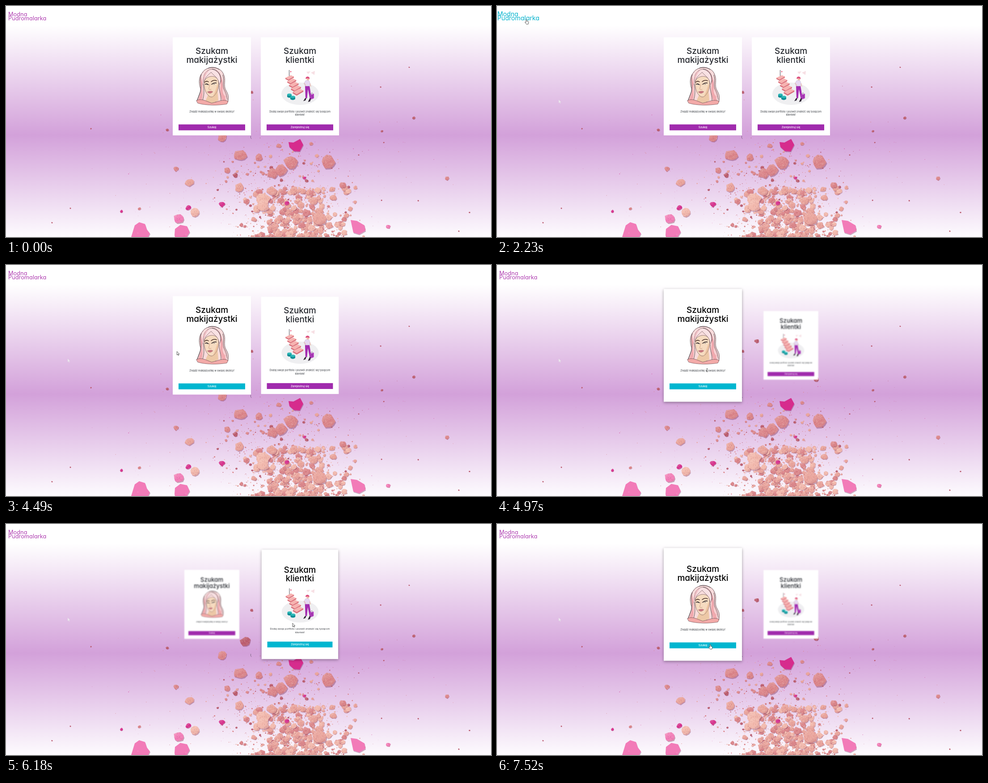
An HTML page with a canvas that plays this animation: 1085x516 px, repeating every 8000 ms.

```html
<!DOCTYPE html>
<html lang="pl">
<head>
<meta charset="utf-8">
<title>Modna Pudromalarka</title>
<style>
  html, body { margin: 0; width: 100%; height: 100%; overflow: hidden; }
  body {
    position: relative;
    background: linear-gradient(#fff 43px, #d3a1da 288px, #fdfbfe 516px);
    font-family: Inter, sans-serif;
    font-feature-settings: "cv11";
  }
  canvas, svg { position: absolute; left: 0; top: 0; }
  .card { top: 70px; width: 175px; height: 219px; overflow: visible; fill: none; text-anchor: middle; }
  .plate { fill: #fff; }
  .title { font-size: 19px; font-weight: 500; fill: #25282e; }
  .note { font-size: 5.6px; fill: #33373d; }
  .button { fill: #a02bad; }
  .label { font-size: 6.1px; font-weight: 500; fill: #fff; }
  .hover .title { fill: #000; }
  .hover .button { fill: #00b6d0; }
  #logo { font-size: 12.8px; transform-origin: 46.5px 22px; }
  #cursor path { stroke: #333; stroke-width: .8; fill: #fff; }
</style>
</head>
<body>
<canvas id="powder" width="1085" height="516"></canvas>

<svg class="card" id="left" style="left:373px" viewBox="373 70 175 219">
  <rect class="plate" x="373" width="175"/>
  <g class="title"><text x="460.5" y="107">Szukam</text><text x="460.5" y="127.3">makijażystki</text></g>
  <g stroke-linecap="round">
    <path fill="#f8dcdc" stroke="#4a3038" stroke-width=".8" d="M440 148C448 134 478 133 486 151C494 166 484 176 493 190C499 200 498 208 496 215L428 214C427 204 437 196 435 184C430 170 432 156 440 148Z"/>
    <path fill="#f0a9ae" d="M436 156C432 172 441 184 434 198C431 205 430 209 430 213L437 213C443 198 438 184 439 172ZM478 154C492 172 478 186 490 202L493 214L484 212C480 198 478 190 480 178Z"/>
    <path fill="#edc8a6" d="M453 197L473 188L475 211L462 218L446 212Z"/>
    <path fill="#f6dbc0" stroke="#5a3c3c" stroke-width=".6" d="M444 167C448 157 467 152 475 165C477 180 474 191 466 200C461 205 456 204 451 198C445 191 442 178 444 167Z"/>
    <path fill="#edc3a0" d="M474 174C476 186 470 197 462 203C468 194 469 184 474 174Z"/>
    <path fill="#f9e1e3" stroke="#4a3038" stroke-width=".6" d="M443 172C444 160 452 154 459 148C465 156 476 160 477 176C486 164 480 146 465 141C450 140 438 152 443 172Z"/>
    <path stroke="#e59aa4" d="M448 147C440 158 440 170 438 182M470 144C482 152 482 168 485 182C487 190 491 196 492 204M453 144C446 152 445 157 444 162"/>
    <path stroke="#3a2a30" stroke-width=".8" d="M437 153C431 168 440 182 433 196C430 203 430 207 427 211M485 154C490 168 482 176 490 190C494 198 494 204 495 209M461 141C474 144 482 154 480 170M477 177C476 190 482 200 481 211M441 174C444 190 443 200 440 210M452 139C460 135 470 137 477 142"/>
    <path stroke="#4b3029" stroke-width="1.5" d="M445 170Q449 166.5 453 169.5M459 169Q464 164.5 471 167"/>
    <path stroke="#231a1f" stroke-width="1.4" d="M445.5 175Q449 172.5 453 176M460 175Q465 171 470.5 172"/>
    <path stroke="#6b737b" stroke-width="1.2" d="M449 175.6h1.5M464.5 174.8h2"/>
    <path stroke="#b98268" stroke-width=".7" d="M456 175C455 181 453 184 454 186Q456 188 459 186"/>
    <path fill="#ca7980" stroke="#94525b" stroke-width=".4" d="M450.5 192Q455 189.5 456 190.5Q459 189 463 191.5Q456 198.500 450.500 192Z"/>
    <path fill="#f3aaa8" stroke="#4a3038" stroke-width=".6" d="M426 211C437 206 447 212 460 217C474 214 486 207 497 213L494 219C474 222.500 446 222.500 429 217Z"/>
  </g>
  <text class="note" x="460.500" y="237.500">Znajdź makijażystkę w swojej okolicy!</text>
  <rect class="button" x="386" y="264.500" width="149" height="13.200"/>
  <text class="label" x="460.500" y="273.300">Szukaj</text>
</svg>

<svg class="card" id="right" style="left:570px" viewBox="570 70 175 219">
  <rect class="plate" x="570" width="175"/>
  <g class="title"><text x="657.500" y="107">Szukam</text><text x="657.500" y="127.300">klientki</text></g>
  <ellipse cx="658" cy="196" rx="42" ry="25" fill="#efeff1"/>
  <path fill="#f7dfe4" d="M672 147l9 -1 -5 6zM682 149l9 -4 -1 9z"/>
  <path stroke="#3b3340" stroke-width=".9" d="M633.500 143v15"/>
  <path fill="#e0486c" d="M636 145l3 1.500 -3 2z"/>
  <g id="stairs"></g>
  <path fill="#0f8d95" d="M629 198v5q5 4 10 0v-5zM636 203v5q5.500 4 11 0v-5z"/>
  <path fill="#2cb9b8" d="M629 198a5 2.500 0 0 1 10 0a5 2.500 0 0 1 -10 0M636 203a5.500 2.600 0 0 1 11 0a5.500 2.600 0 0 1 -11 0"/>
  <path fill="#a32cb0" d="M669 178h10l2 12 2 16h-3.500l-4 -20 -2 20h-3.500z"/>
  <path fill="#e6d8f2" stroke="#a79abb" stroke-width=".4" d="M670 167q4 -2 8 0l3 7 -2 5h-9.500l-3 -6z"/>
  <path stroke="#eab7a8" stroke-width="1.300" d="M667 172l4 6M680 173l2 7"/>
  <circle cx="675.500" cy="163" r="3" fill="#f0b9a8"/>
  <path fill="#dd4f7f" d="M670.500 163q-1 -5 4.500 -5.500q5 1 4 5.500q-4 -3 -8.500 0z"/>
  <path fill="#2e2634" d="M669 206h3l-2 5 -5 1.500zM679.500 206h3l-2 7 -5 1.500z"/>
  <path fill="#b03fbd" d="M680 198l9 -2v10l-7 3z"/>
  <path stroke="#5d2468" stroke-width=".7" d="M682 197q2 -5 5 -1M685 199v6"/>
  <g class="note"><text x="657.500" y="237.500">Dodaj swoje portfolio i pozwól znaleźć się tysiącom</text><text x="657.500" y="245.400">klientek!</text></g>
  <rect class="button" x="583" y="264.500" width="149" height="13.200"/>
  <text class="label" x="657.500" y="273.300">Zarejestruj się</text>
</svg>

<svg width="1085" height="516">
  <g id="logo"><text x="5" y="22.500">Modna</text><text x="5" y="31.500">Pudromalarka</text></g>
  <path id="trace" fill="#eee5f0" stroke="#d8c8dc" stroke-width=".5" d="M138 209v8l1.900 -1.700 1.200 2.700 1.300 -.6 -1.200 -2.600h2.400z"/>
  <g id="cursor"><path/></g>
</svg>

<script>
const $ = id => document.getElementById(id);
const LOOP = 8000;

// ---- Powder ----
const ctx = $('powder').getContext('2d');
let seed = 4711;
const rand = () => (seed = seed * 16807 % 2147483647) / 2147483647;
const bell = () => (rand() + rand() + rand()) / 1.5 - 1;
const CORAL = 0, ROSE = 1, DUSK = 2, PINK = 3, MAGENTA = 4, PALE = 5;
const COLORS = ['#e9a39b', '#da8388', '#b9596c', '#f27bb8', '#d62c8d', '#f2b8ac'];

function rock(x, y, r, color) {
  const shape = new Path2D();
  const turn = rand() * 6.28, sides = r > 4 ? 10 : 6;
  for (let i = 0; i < sides; i++) {
    const a = turn + i / sides * 6.28, d = r * (.75 + .4 * rand());
    shape.lineTo(x + d * Math.cos(a), y + d * Math.sin(a) * .92);
  }
  shape.closePath();
  ctx.save();
  if (r > 2) {
    ctx.translate(r * .1, r * .16);
    ctx.fillStyle = 'rgba(125,50,85,.4)';
    ctx.fill(shape);
    ctx.translate(-r * .1, -r * .16);
  }
  ctx.fillStyle = COLORS[color];
  ctx.fill(shape);
  if (r > 2) {
    ctx.clip(shape);
    const light = ctx.createLinearGradient(x - r * .6, y - r, x + r * .6, y + r);
    light.addColorStop(0, 'rgba(255,235,225,.3)');
    light.addColorStop(.55, 'rgba(255,235,225,0)');
    light.addColorStop(1, 'rgba(130,35,65,.35)');
    ctx.fillStyle = light;
    ctx.fill(shape);
    for (let i = 0; i < r * r * .5; i++) {
      ctx.fillStyle = i % 2 ? 'rgba(255,230,220,.28)' : 'rgba(140,45,70,.18)';
      ctx.fillRect(x + (rand() * 2 - 1) * r, y + (rand() * 2 - 1) * r, 1.4, 1.2);
    }
  }
  ctx.restore();
}

const pick = (...colors) => colors[Math.floor(rand() * colors.length)];

// Dust, loose crumbs, then the heap at the bottom
ctx.globalAlpha = .6;
for (let i = 0; i < 300; i++)
  rock(600 + bell() * 520, 375 + bell() * 240, .4 + .7 * rand() ** 2, pick(ROSE, DUSK, ROSE, MAGENTA));
ctx.globalAlpha = 1;
for (let i = 0; i < 330; i++)
  rock(605 + bell() * 240, 415 + bell() * 150, .8 + 4 * rand() ** 4, pick(ROSE, ROSE, CORAL, DUSK));
for (let i = 0; i < 620; i++) {
  const rise = rand() ** 1.5;
  rock(652 + bell() * (165 - 20 * rise), 518 - 112 * rise, 1.2 + 8 * rand() ** 3, pick(CORAL, ROSE, PALE, CORAL));
}

const boulders = [
  [721, 348, 17, ROSE], [637, 350, 16, ROSE], [596, 373, 13, ROSE], [615, 367, 15, ROSE],
  [524, 334, 14, ROSE], [565, 338, 9, ROSE], [536, 262, 12, DUSK], [484, 294, 10, ROSE],
  [410, 394, 10, CORAL], [380, 364, 6, ROSE], [495, 367, 8, ROSE], [513, 378, 6, DUSK],
  [575, 432, 16, PALE], [575, 446, 14, PALE], [594, 413, 12, CORAL], [522, 405, 11, CORAL],
  [754, 400, 8, ROSE], [386, 476, 12, PINK], [422, 461, 10, PALE], [408, 451, 6, MAGENTA],
  [483, 443, 7, MAGENTA], [855, 493, 5, PINK], [912, 250, 4, DUSK], [987, 385, 5, ROSE],
  [298, 453, 4, ROSE], [258, 459, 4, MAGENTA], [714, 255, 6, DUSK], [581, 170, 5, DUSK],
  [550, 193, 4, DUSK], [361, 277, 4, DUSK], [700, 474, 17, CORAL], [628, 440, 5, MAGENTA],
  [668, 384, 4, MAGENTA], [841, 280, 3, DUSK], [610, 312, 6, ROSE]
];
for (const b of boulders) rock(...b);
const specks = [[103, 484], [144, 452], [190, 274], [838, 181], [902, 137], [845, 305], [789, 333], [922, 435], [1037, 461], [1013, 503], [840, 434]];
for (const [x, y] of specks) rock(x, y, 1.8, DUSK);

// Smooth pigment shards
function shard(color, outline) {
  const path = new Path2D(outline);
  ctx.fillStyle = 'rgba(120,30,90,.35)';
  ctx.translate(1, 2); ctx.fill(path); ctx.translate(-1, -2);
  ctx.fillStyle = COLORS[color];
  ctx.fill(path);
  ctx.save();
  ctx.clip(path);
  for (let i = 0; i < 120; i++) {
    ctx.fillStyle = i % 2 ? 'rgba(255,220,240,.2)' : 'rgba(150,20,90,.1)';
    ctx.fillRect(280 + rand() * 530, 295 + rand() * 221, 3, 1.5);
  }
  ctx.restore();
}
shard(MAGENTA, 'M632 304L643 305 658 297 665 310 657 325 644 324 634 315Z');
shard(PINK, 'M280 516L288 490 298 483 311 487 315 499 322 508 318 516Z');
shard(PINK, 'M377 512L378 498 390 489 405 492 411 505 404 516H378Z');
shard(PINK, 'M771 478L785 480 802 490 804 502 790 510 777 506Z');
ctx.strokeStyle = '#6d5a72';
ctx.lineWidth = .8;
ctx.stroke(new Path2D('M547.500 290v5l2 1.500'));

// ---- Stairs ----
$('stairs').innerHTML = [0, 1, 2, 3, 4].map(i => {
  const x = 634 + i * 4.700, y = 158.500 + i * 7.800, w = 1 + i * .06;
  return `<g transform="translate(${x} ${y}) scale(${w})">
    <path fill="#d9707c" d="M-9 2v2.500l7 4 12 -7v-2.500z"/><path fill="#f6b3b1" d="M-9 2l12 -6 7 3 -12 7z"/></g>`;
}).join('');

// ---- Motion ----
function ease(p) {
  let lo = 0, hi = 1, u = .5;
  for (let i = 0; i < 16; i++) {
    u = (lo + hi) / 2;
    const x = .75 * u * (1 - u) + u ** 3;
    if (x < p) lo = u; else hi = u;
  }
  return .3 * u * (1 - u) ** 2 + 3 * u * u * (1 - u) + u ** 3;
}

// Each step: start time, grown, shrunk
const cards = [
  { el: $('left'), steps: [[4470, 1, 0], [5745, 0, 1], [7005, 1, 0]] },
  { el: $('right'), steps: [[4470, 0, 1], [5843, 1, 0], [6983, 0, 1]] }
];

function poseCard({ el, steps }, t) {
  let grown = 0, shrunk = 0, hover = false;
  for (const [start, g, s] of steps) {
    if (t < start) break;
    const k = t >= start + 500 ? 1 : ease((t - start) / 500);
    grown += (g - grown) * k;
    shrunk += (s - shrunk) * k;
    hover = g === 1;
  }
  const plate = el.querySelector('.plate');
  plate.setAttribute('y', 70 - 16.500 * grown);
  plate.setAttribute('height', 219 + 33 * grown);
  el.classList.toggle('hover', hover);
  el.style.transform = `scale(${1 - .3 * shrunk})`;
  el.style.filter = grown || shrunk
    ? `blur(${1.700 * shrunk}px) drop-shadow(0 2px 3px rgba(0,0,0,${.35 * grown}))` : 'none';
}

const ARROW = 'M0 0V8L1.900 6.300 3.100 9 4.400 8.400 3.200 5.800H5.600Z';
const HAND = 'M-1 1a1 1 0 0 1 2 0V4l3 .8q1 .3 .8 1.500L4 10.500H-.5L-3.500 6.500q0 -1.200 1.200 -.8L-1 6.500Z';
const BEAM = 'M-1.500 -3.500H1.500M0 -3.500V3.500M-1.500 3.500H1.500';
const shapes = [[580, ARROW], [2020, HAND], [4020, ARROW], [4640, BEAM], [5400, ARROW], [5860, BEAM], [5970, ARROW], [7380, HAND]];
const route = [
  [580, 934, 502], [1350, 301, 337], [1700, 138, 209], [2160, 66, 30], [3949, 66, 30],
  [3950, 81, 36], [4470, 376, 190], [4780, 470, 235], [5110, 470, 235], [5745, 548, 226],
  [5843, 596, 222], [5910, 622, 221], [6380, 655, 222], [6730, 655, 222], [6983, 568, 225],
  [7010, 514, 222], [7450, 477, 269], [LOOP, 477, 269]
];

function poseCursor(t) {
  const cursor = $('cursor');
  cursor.style.display = t < 580 ? 'none' : '';
  if (t < 580) return;
  const i = route.findIndex(p => p[0] > t);
  const [t0, x0, y0] = route[i - 1], [t1, x1, y1] = route[i];
  const k = (t - t0) / (t1 - t0);
  cursor.setAttribute('transform', `translate(${x0 + (x1 - x0) * k} ${y0 + (y1 - y0) * k})`);
  cursor.firstChild.setAttribute('d', shapes.findLast(s => s[0] <= t)[1]);
}

const ramp = (t, start) => Math.min(1, Math.max(0, (t - start) / 200));

function frame(now) {
  const t = now % LOOP;
  cards.forEach(card => poseCard(card, t));
  const lit = ramp(t, 2000) - ramp(t, 4000);
  $('logo').style.transform = `scale(${1 + .1 * lit})`;
  $('logo').style.fill = `color-mix(in srgb, #00b1cc ${lit * 100}%, #ae3db0)`;
  $('trace').style.display = t < 1700 ? 'none' : '';
  poseCursor(t);
  requestAnimationFrame(frame);
}
requestAnimationFrame(frame);
</script>
</body>
</html>
```
